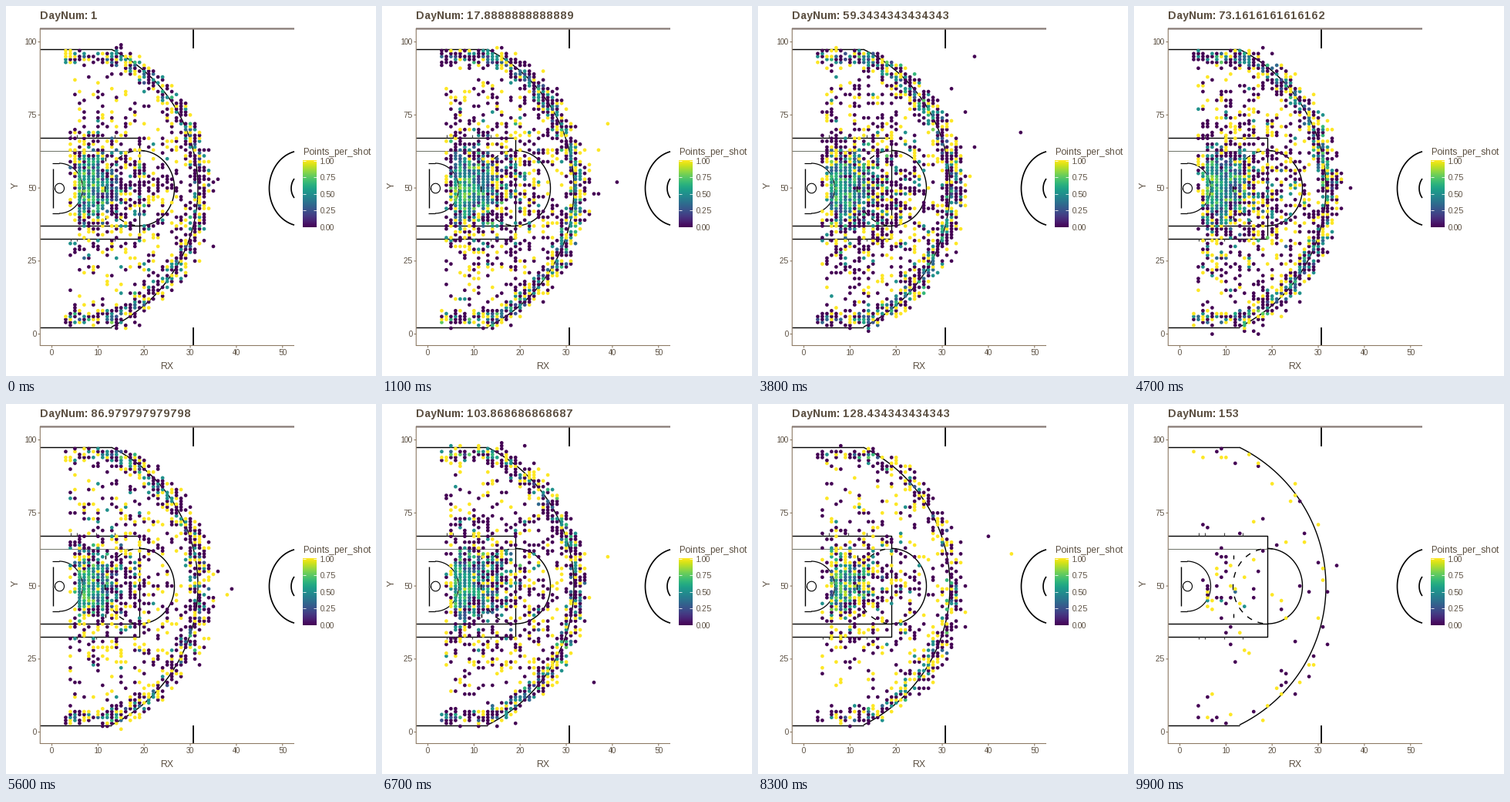
Animation of 480x480 px, one loop 10000 ms. Source, as a matplotlib script:

```python
import matplotlib.pyplot as plt
import numpy as np
from matplotlib.animation import FuncAnimation

FRAMES, STEP_MS, DAYS = 100, 100, 153
TEXT, LINE = "#5b4f41", "#8d7a64"
plt.rcParams.update({"font.family": "Liberation Sans", "text.hinting_factor": 1})

# Shots per day over a week; the season fades out after day 120.
WEEK = [500, 2200, 2000, 3000, 1100, 2400, 400]
ARC_X, ARC_Y, ARC_R = 48.4, 236.3, 200.6
X0, DX, Y0, DY = 59.5, 5.985, 425.6, 3.79

fig = plt.figure(figsize=(480 / 72, 480 / 72), dpi=72, facecolor="white")
ax = fig.add_axes([0, 0, 1, 1])


def px(x):
    return X0 + DX * x


def py(y):
    return Y0 - DY * y


def line(xs, ys, color="black", lw=1.4, z=1, **kw):
    ax.plot(xs, ys, color=color, lw=lw, zorder=z, solid_capstyle="butt", **kw)


def axis_line(xs, ys, color=LINE, lw=1.1):
    line(xs, ys, color, lw, snap=False)


def arc(cx, cy, rx, ry, a0, a1, lw=1.4):
    a = np.radians(np.linspace(a0, a1, 90))
    line(cx + rx * np.cos(a), cy + ry * np.sin(a), lw=lw)


def label(x, y, s, size=9.6, ha="left", **kw):
    return ax.text(x, y, s, fontsize=size, ha=ha, va="baseline", color=TEXT, **kw)


def draw_court():
    for y in (56, 417):
        line([44, 137], [y, y])
    tip = np.degrees(np.arctan2(180.3, 88.6))
    arc(ARC_X, ARC_Y, ARC_R, ARC_R, -tip, tip)
    line([243, 243], [30, 55], lw=1.8)
    line([243, 243], [417, 440], lw=1.8)

    # key, lane and hash marks
    line([44, 173, 173, 44], [171, 171, 302, 302])
    line([44, 173], [187.5, 187.5], "#70756a", 1)
    line([44, 174], [285, 285])
    for x in (84, 92, 116.5, 141):
        line([x, x], [167, 171], "#444444", 1.2)
        line([x, x], [302, 305], "#444444", 1.2)
    arc(173.5, 236.3, 45, 48.8, -90, 90)
    for a in np.arange(98, 270, 19):
        arc(173.5, 236.3, 45, 48.8, a, a + 9)
    for y in (196, 272):
        line([129, 129], [y, y + 5])

    # hoop
    line([60.5, 60.5], [211, 261.5])
    line([60, 63.5], [236.5, 236.5], "#666666", 1)
    arc(69.5, 236.5, 6, 6.3, 0, 360, 1.1)
    for y in (204, 269):
        line([60, 69], [y, y], lw=1.2)
    arc(69, 236.5, 30.5, 32.5, -90, 90, 1.2)

    # centre circles, cut at the panel edge
    for rx, ry in ((42.5, 49), (14, 17.8)):
        cut = np.degrees(np.arccos(10 / rx))
        arc(384, 236.5, rx, ry, 180 - cut, 180 + cut, 1.7)


def draw_axes():
    axis_line([44, 374], [29.5, 29.5], "#857873", 2.2)
    axis_line([44.3, 44.3], [29, 441])
    axis_line([44, 374], [440.5, 440.5])
    for v in range(0, 51, 10):
        axis_line([px(v)] * 2, [440.5, 443.5])
        label(px(v), 453.3, str(v), ha="center")
    for v in range(0, 101, 25):
        axis_line([41.5, 44.5], [py(v)] * 2)
        label(39.5, py(v) + 3.5, str(v), ha="right")
    label(209, 471, "RX", 12, "center")
    ax.text(12.7, 233, "Y", fontsize=12, color=TEXT, rotation=90,
            ha="center", va="center")


def draw_legend():
    label(385, 193, "Points_per_shot", 12)
    ax.imshow(np.linspace(0, 1, 256)[:, None], cmap="viridis", aspect="auto",
              origin="lower", extent=(385.3, 402.6, 286.8, 200.5))
    for k in range(5):
        y = 286.6 - 21.5 * k
        label(408, y + 4, f"{k / 4:.2f}")
        for x in (385.3, 399.1):
            line([x, x + 3.5], [y, y], "white", 0.8, 3)


def shots(i):
    """Grid cells hit on one day and the mean score in each."""
    rng = np.random.default_rng(500 + i)
    day = 1 + i * (DAYS - 1) / (FRAMES - 1)
    n = int(WEEK[int(day) % 7] * np.exp(-max(0, day - 120) / 27))
    rim, mid, three, corner = rng.multinomial(n, [0.38, 0.29, 0.27, 0.06])

    rx = 5.3 + rng.gamma(2, 1.9, rim)
    ry = rng.normal(50, 5.3, rim)

    mx = 3.5 + 26 * rng.beta(1.2, 1.6, mid)
    my = rng.normal(50, 20, mid)
    inside = np.hypot(px(mx) - ARC_X, py(my) - ARC_Y) < 198
    mx, my = mx[inside], my[inside]

    # threes hug the line, deeper at the top and tighter towards the corners
    u = rng.uniform(-1, 1, three)
    a = np.radians(63 * u)
    r = rng.normal(204 - 11 * u ** 2, 7.5)
    tx = (ARC_X + r * np.cos(a) - X0) / DX
    ty = (Y0 - ARC_Y - r * np.sin(a)) / DY

    cx = rng.uniform(2.6, 15, corner)
    cy = 50 + rng.choice([-1, 1], corner) * rng.normal(44.7, 1.3, corner)

    far = rng.poisson(n / 350)
    fx = 32 + rng.exponential(4, far).clip(0, 15)
    fy = rng.normal(54, 17, far)

    x = np.rint(np.concatenate([rx, mx, tx, cx, fx]))
    y = np.rint(np.concatenate([ry, my, ty, cy, fy]))
    close = np.exp(-((x - 6) / 5) ** 2 - ((y - 50) / 8) ** 2)
    made = rng.random(len(x)) < 0.37 + 0.28 * close
    cells, idx = np.unique(np.column_stack([x, y]), axis=0, return_inverse=True)
    idx = idx.ravel()
    return cells, np.bincount(idx, made) / np.bincount(idx)


draw_court()
draw_axes()
draw_legend()
title = label(44, 17, "", 14.4, weight="bold")
dots = ax.scatter([], [], s=4.7 ** 2, c=[], cmap="viridis", vmin=0, vmax=1,
                  linewidths=0, zorder=4)
ax.set(xlim=(0, 480), ylim=(480, 0))
ax.axis("off")


def update(i):
    cells, score = shots(i)
    dots.set_offsets(np.column_stack([px(cells[:, 0]), py(cells[:, 1])]))
    dots.set_array(score)
    day = 1 + i * (DAYS - 1) / (FRAMES - 1)
    title.set_text(f"DayNum: {day:.15g}")
    return dots, title


anim = FuncAnimation(fig, update, frames=FRAMES, interval=STEP_MS,
                     repeat=True, repeat_delay=0)
plt.show()
```
